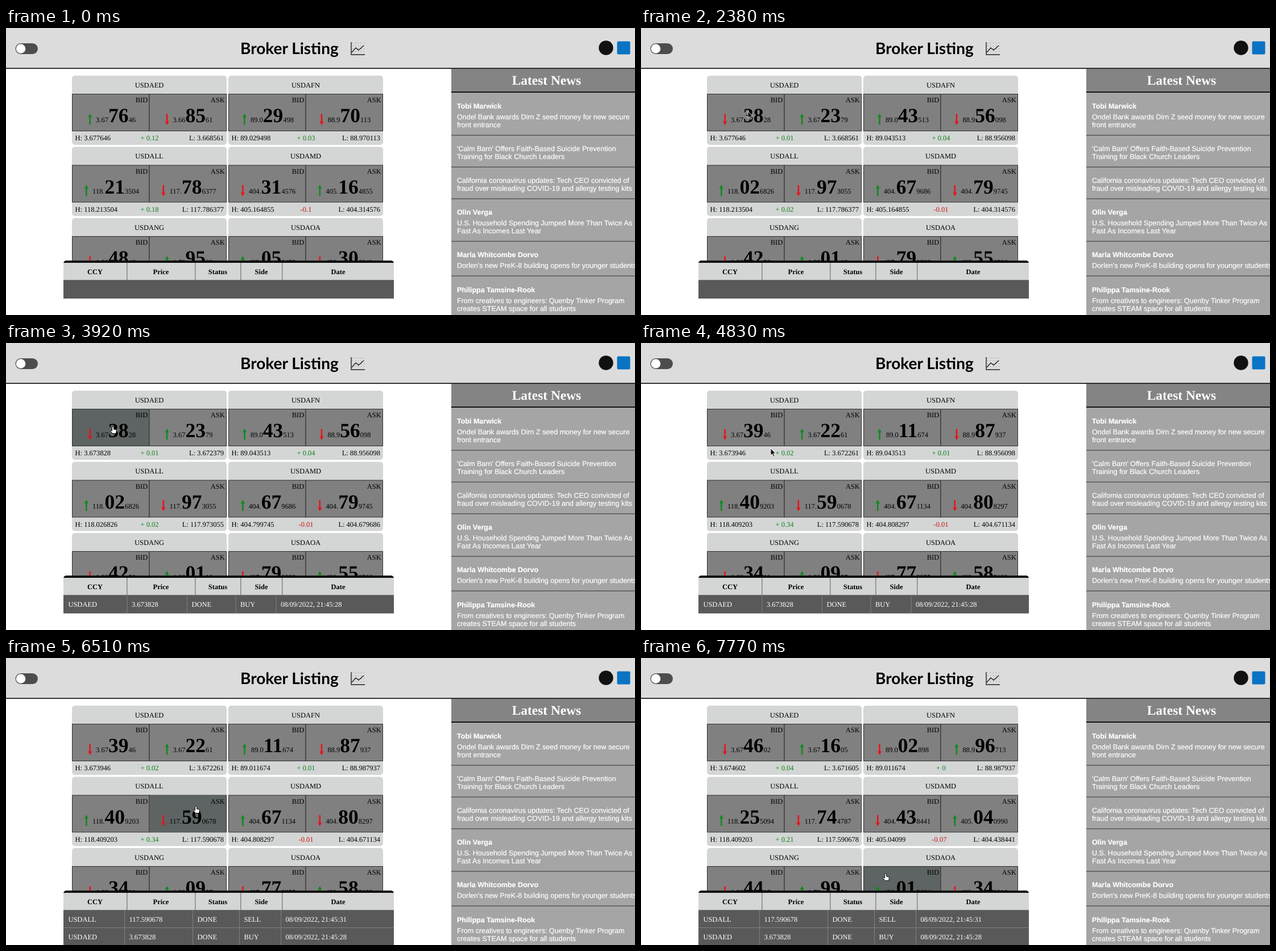
These frames come from a looping animation (1106x506 px, 8 s). An HTML page:

```html
<!DOCTYPE html>
<html lang="en">
<head>
<meta charset="utf-8">
<title>Broker Listing</title>
<style>
  html, body { margin: 0; width: 100%; height: 100%; overflow: hidden; background: #fff; }
  svg { display: block; }
  text { font: 12.5px "Liberation Serif", "Times New Roman", serif; text-rendering: geometricPrecision; }
  .big { font-size: 35.5px; font-weight: bold; }
  .bold { font-weight: bold; }
  .news { font-family: "Liberation Sans", Arial, sans-serif; fill: #fff; stroke: #fff; stroke-width: .2px; }
  .head { font-size: 23.4px; font-weight: bold; fill: #fff; }
  .title { font: bold 28px Lato, sans-serif; }
</style>
</head>
<body>
<svg width="1106" height="506" viewBox="0 0 1106 506">
  <g id="page"></g>
  <g id="live"></g>
</svg>
<script>
const LOOP = 8000, STEP = 70;
const TICKS = [1470, 4060, 6720];   // new quotes arrive
const TRADES = [3780, 6440];        // orders fill, highs and lows restart

// bid + ask is constant per pair; up: bid arrow direction for each quote
const PAIRS = [
  { name: 'USDAED', sum: 7.346207, up: '1000', bids: [3.677646, 3.673828, 3.673946, 3.674602] },
  { name: 'USDAFN', sum: 177.999611, up: '1110', bids: [89.029498, 89.043513, 89.011674, 89.002898] },
  { name: 'USDALL', sum: 235.999881, up: '1111', bids: [118.213504, 118.026826, 118.409203, 118.255094] },
  { name: 'USDAMD', sum: 809.479431, up: '0110', bids: [404.314576, 404.679686, 404.671134, 404.438441] },
  { name: 'USDANG', sum: 3.604368, up: '0000', bids: [1.804846, 1.80425, 1.803411, 1.804417] },
  { name: 'USDAOA', sum: 856.358494, up: '1001', bids: [428.052453, 427.799898, 427.773355, 428.015684] },
];

const NEWS = [
  { y: 142, by: 'Tobi Marwick', lines: ['Ondel Bank awards Dirn Z seed money for new secure', 'front entrance'] },
  { y: 198, lines: ["'Calm Barn' Offers Faith-Based Suicide Prevention", 'Training for Black Church Leaders'] },
  { y: 254, lines: ['California coronavirus updates: Tech CEO convicted of', 'fraud over misleading COVID-19 and allergy testing kits'] },
  { y: 329, by: 'Olin Verga', lines: ['U.S. Household Spending Jumped More Than Twice As', 'Fast As Incomes Last Year'] },
  { y: 404, by: 'Marla Whitcombe Dorvo', lines: ["Dorlen's new PreK-8 building opens for younger students"] },
  { y: 465.5, by: 'Philippa Tamsine-Rook', lines: ['From creatives to engineers: Quenby Tinker Program', 'creates STEAM space for all students'] },
];

const ORDERS = [
  ['USDAED', '3.673828', 'DONE', 'BUY', '08/09/2022, 21:45:28'],
  ['USDALL', '117.590678', 'DONE', 'SELL', '08/09/2022, 21:45:31'],
];

// time, x, y of the pointer tip
const PATH = [
  [420, 430, 512], [840, 331, 386], [1190, 248, 165], [1400, 248, 165], [1680, 178, 131],
  [1820, 178, 131], [2100, 187, 147], [2310, 187, 147], [2380, 188, 147], [4480, 188, 147],
  [4830, 228, 186], [5320, 325, 246], [5390, 332, 246], [5740, 332, 246], [5950, 334, 261],
  [7000, 334, 261], [7210, 388, 310], [7560, 430, 380], [8000, 430, 380],
];
// card, side (0 bid, 1 ask), start, end
const HOVERS = [[0, 0, 3710, 4550], [2, 1, 5180, 7210], [5, 0, 7420, 9000]];
// start, end, x, y, radius
const CLICKS = [[2940, 3150, 188, 148.5, 18], [6090, 6230, 334, 260, 24]];
const HANDS = [[3710, 4620], [5250, 9000]];

const rect = (x, y, w, h, fill, extra = '') =>
  `<rect x="${x}" y="${y}" width="${w}" height="${h}" fill="${fill}" ${extra}/>`;
const text = (x, y, s, extra = '') => `<text x="${x}" y="${y}" ${extra}>${s}</text>`;
const path = (d, extra) => `<path d="${d}" ${extra}/>`;
const MID = 'text-anchor="middle"', END = 'text-anchor="end"', WHITE = 'fill="#fff"';
const clamp = v => Math.max(0, Math.min(1, v));
const during = (t, [from, to]) => t >= from && t < to;

function header() {
  let dots = '';
  for (let x = 609; x < 631; x += 5) for (let y = 26; y < 46; y += 5)
    dots += rect(x, y, 1, 1, '#777');
  return rect(0, 0, 1106, 70, '#dcdcdc') + rect(0, 70.3, 1106, 1.7, '#111') +
    rect(16.5, 27, 39.5, 19, '#4d4d4d', 'rx="9.5"') + '<circle cx="26" cy="36.5" r="8.3" fill="#fff"/>' +
    text(412, 46, 'Broker Listing', 'class="title"') + dots +
    path('M607 25V47H631', 'fill="none" stroke="#222" stroke-width="1.4"') +
    path('M608 43L615 35L620 39L629 31', 'fill="none" stroke="#222" stroke-width="1.4"') +
    '<circle cx="1055" cy="35" r="12.7" fill="#111"/>' + rect(1074.5, 23.5, 23, 23, '#0a73c4', 'rx="2"');
}

function news() {
  let out = rect(783, 72, 323, 434, '#a5a5a5') + rect(783, 72, 323, 40, '#848484') +
    rect(783, 112, 323, 2, '#111') + text(950.5, 99.5, 'Latest News', `class="head" ${MID}`);
  for (const y of [188.5, 244.5, 300.5, 375.5, 436.5]) out += rect(783, y, 323, 1.2, '#444');
  for (const { y, by, lines } of NEWS) {
    if (by) out += text(793, y, by, 'class="news bold"');
    lines.forEach((line, i) => out += text(793, y + 19.3 + 14 * i, line, 'class="news"'));
  }
  return out;
}

function arrow(x, y, up) {
  const color = up ? '#0c8a1c' : '#ec1018';
  return `<g transform="translate(${x} ${y}) scale(1 ${up ? 1 : -1})">` +
    path('M0 -8V9.5', `stroke="${color}" stroke-width="2.5"`) +
    path('M0 -10L4 -2.5L0 -5L-4 -2.5Z', `fill="${color}"`) + '</g>';
}

function quote(x, y, label, value, up, hover) {
  const s = value.toFixed(6), tail = s.slice(6), cx = x + 76.5;
  const width = 35.5 + 12.5 * (1.75 + tail.length / 2);
  return rect(x, y + .5, 135.5, 65, '#808080', 'stroke="#2d2d2d"') +
    (hover ? rect(x + .5, y + 1, 134.5, 64, '#5d6463', `opacity="${hover}"`) : '') +
    text(x + 132.7, y + 15.2, label, END) + arrow(cx - width / 2 - 10.5, y + 45, up) +
    text(cx, y + 50, `${s.slice(0, 4)}<tspan class="big">${s.slice(4, 6)}</tspan>${tail}`, MID);
}

function card(pair, index, t, tick, since) {
  const x = index % 2 ? 391 : 116, y = 84 + 125.5 * (index >> 1);
  const ask = i => +(pair.sum - pair.bids[i]).toFixed(6);
  const seen = [];
  for (let i = since; i <= tick; i++) seen.push(pair.bids[i], ask(i));
  const high = 'H: ' + Math.max(...seen), low = 'L: ' + Math.min(...seen);
  const mid = pair.sum / 2, bid = pair.bids[tick], up = pair.up[tick] === '1';
  const change = Math.trunc((bid - mid) / mid * 1e4) / 100;
  // the change sits midway between high and low, one digit is 6.25 wide
  const changeX = x + 136.5 + (high.length - low.length) * 6.25 / 2;
  const hover = side => {
    const h = HOVERS.find(([c, s]) => c === index && s === side);
    return h ? clamp((t - h[2]) / 140) * clamp((h[3] + 140 - t) / 140) : 0;
  };
  return rect(x, y, 272, 122, '#d3d6d5', 'rx="5"') +
    text(x + 136, y + 20.5, pair.name, MID) +
    quote(x + .5, y + 32, 'BID', bid, up, hover(0)) +
    quote(x + 136, y + 32, 'ASK', ask(tick), !up, hover(1)) +
    text(x + 5.5, y + 114, high) + text(x + 267, y + 114, low, END) +
    text(changeX, y + 114, change < 0 ? change : '+ ' + change,
      `${MID} fill="${change < 0 ? '#d01010' : '#108018'}"`);
}

function table(count) {
  let out = rect(101, 410, 581, 20, '#0c0c0c', 'rx="5"') + rect(101, 414, 581, 30.5, '#d3d6d5');
  for (const x of [212, 332, 412, 485]) out += rect(x, 414, 1.5, 30.5, '#858585');
  ['CCY', 'Price', 'Status', 'Side', 'Date'].forEach((s, i) =>
    out += text([156.5, 272.5, 372.5, 449, 584][i], 433.7, s, `class="bold" ${MID}`));
  out += rect(101, 444.5, 581, count > 1 ? 61.5 : 32.5, '#595959') + rect(101, 444, 581, 1, '#777');
  const columns = count > 1 ? [101, 208, 328, 410, 483] : [101, 212.5, 318, 403.5, 474.5];
  ORDERS.slice(0, count).reverse().forEach((order, row) => order.forEach((s, i) => {
    const y = 445 + 30.5 * row;
    out += text(columns[i] + 8.4, y + 20.4, s, WHITE);
    if (i) out += rect(columns[i], y, 1, count > 1 ? 30.5 : 32, '#808080');
  }));
  if (count) out += rect(101, count > 1 ? 475 : 476, 581, 1, '#808080');
  return out;
}

function pointer(t) {
  if (t < PATH[0][0]) return '';
  const next = PATH.findIndex(p => p[0] > t), [t0, x0, y0] = PATH[next - 1], [t1, x1, y1] = PATH[next];
  const k = (t - t0) / (t1 - t0), x = x0 + (x1 - x0) * k, y = y0 + (y1 - y0) * k;
  const shape = HANDS.some(h => during(t, h))
    ? path('M-1.5 1Q0 -.8 1.3 1V5L5 5.8Q6.5 6.2 6.3 8L5.5 12.5H-1L-4.3 8Q-4.6 6 -2.8 6.8L-1.5 8Z',
      'fill="#fff" stroke="#111" stroke-width="1"')
    : path('M0 0V12L2.8 9.5L4.8 14L6.8 13.1L4.9 8.8H8.6Z', 'fill="#111" stroke="#fff" stroke-width=".8"');
  return `<g transform="translate(${x} ${y})">${shape}</g>`;
}

function ring([, , x, y, r]) {
  const circle = (radius, color, w) =>
    `<circle cx="${x}" cy="${y}" r="${radius}" fill="none" stroke="${color}" stroke-width="${w}"/>`;
  return circle(r - 1, '#ddd', 1) + circle(r, '#111', 1.3);
}

const page = document.getElementById('page'), live = document.getElementById('live');
page.innerHTML = header() + news();

let shown = -1;
function draw(now) {
  const t = Math.floor(now % LOOP / STEP) * STEP;
  if (t !== shown) {
    shown = t;
    const passed = times => times.filter(at => t >= at).length;
    const tick = passed(TICKS), trades = passed(TRADES);
    live.innerHTML = PAIRS.map((pair, i) => card(pair, i, t, tick, trades)).join('') +
      table(trades) + CLICKS.filter(c => during(t, c)).map(ring).join('') + pointer(t);
  }
  requestAnimationFrame(draw);
}
draw(performance.now());
</script>
</body>
</html>
```
